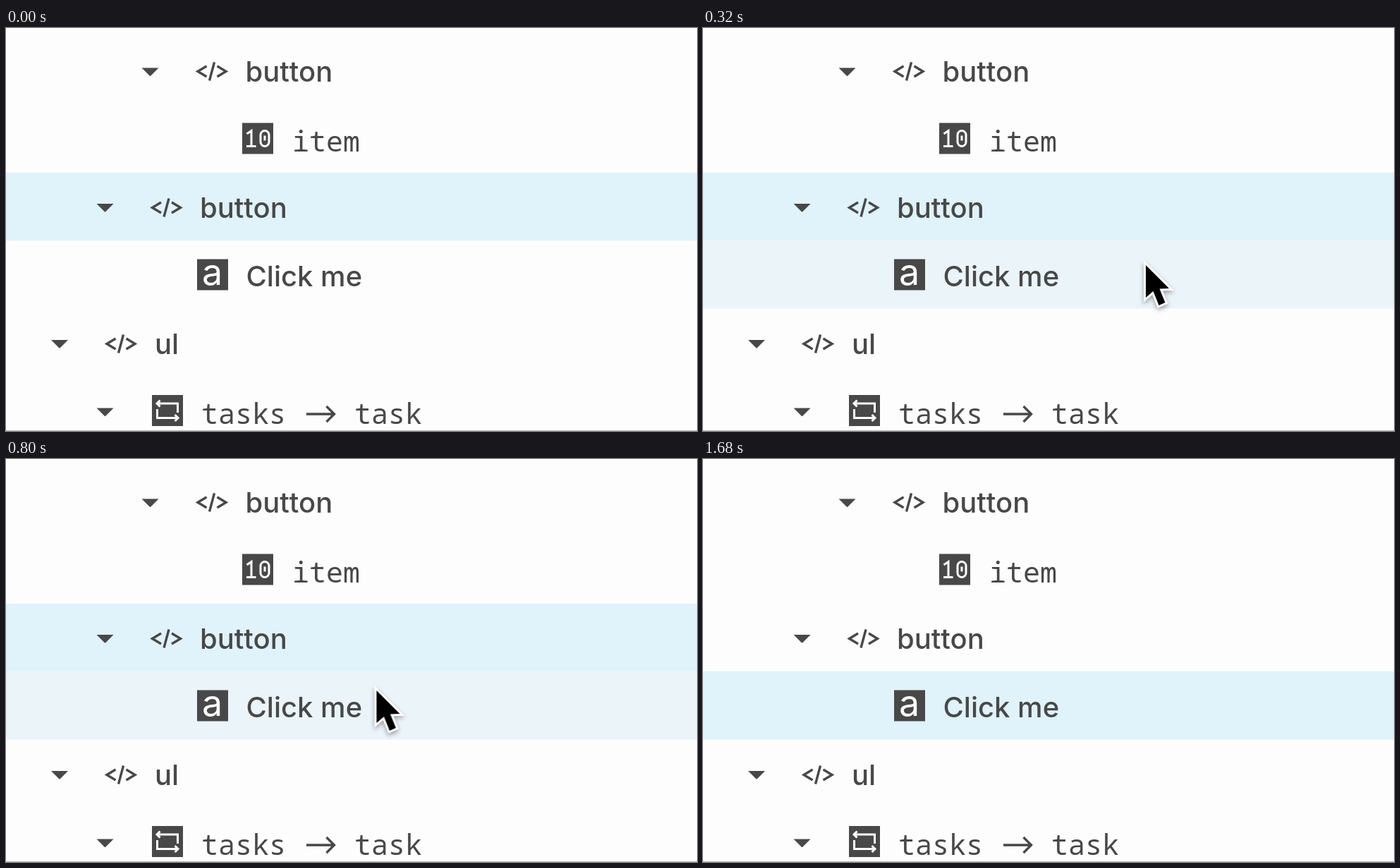
Recreate the animation shown at these times as an HTML page. Size 980 px wide and 571 px high, loop 2240 ms.

```html
<!DOCTYPE html>
<html lang="en">
<head>
<meta charset="utf-8">
<title>Tree selection</title>
<style>
  html, body { margin: 0; width: 100%; height: 100%; overflow: hidden; background: #fdfdfd; }
  svg { display: block; width: 980px; height: 571px; }
  text { fill: #484848; font: 500 40px Inter, sans-serif; }
  .mono { font: 400 40px "Noto Sans Mono", monospace; }
  .letter { fill: #fff; font: 400 52px Inter, sans-serif; text-anchor: middle; }
  .dark { fill: #484848; }
  .line { fill: none; stroke: #484848; stroke-width: 3.4; }
  .light { fill: none; stroke: #fff; stroke-width: 3; }

  .select, .hover, .cursor { animation: 2240ms step-end infinite; }
  .select { fill: #e0f2fa; animation-name: select; }
  .hover { fill: #eaf4f9; animation-name: hover; }
  .cursor { animation-name: cursor; filter: drop-shadow(0 3px 3px rgba(0, 0, 0, .35)); }

  @keyframes select {
    0% { transform: translateY(204.8px); }
    46.42%, 100% { transform: translateY(301.2px); }
  }
  @keyframes hover {
    0% { transform: translateY(600px); }
    7.14% { transform: translateY(494px); }
    14.28% { transform: translateY(301.2px); }
    17.85% { transform: translateY(600px); }
    32.14% { transform: translateY(301.2px); }
    46.42%, 100% { transform: translateY(600px); }
  }
  @keyframes cursor {
    0% { transform: translate(1100px, 700px); }
    7.14% { transform: translate(778px, 546px); }
    10.71% { transform: translate(717px, 451px); }
    14.28% { transform: translate(628px, 336px); }
    17.85% { transform: translate(584px, 298px); }
    28.57% { transform: translate(582px, 298px); }
    32.14% { transform: translate(548px, 313px); }
    35.71% { transform: translate(525.5px, 328px); }
    60.71% { transform: translate(526px, 333px); }
    71.42% { transform: translate(632px, 333px); }
    74.99%, 100% { transform: translate(1100px, 700px); }
  }
</style>
</head>
<body>
<svg viewBox="0 0 980 571">
  <defs>
    <path id="caret" class="dark" d="M-12-5.500h24L1 5.500Q0 6.500-1 5.500Z"/>
    <g id="tag" class="line">
      <path d="M-7.500-8-20-.5-7.500 7M7.500-8 20-.5 7.500 7"/>
      <path d="M3.500-13.500-3.500 12.500"/>
    </g>
    <rect id="box" class="dark" x="-22" y="-22" width="44" height="44"/>
  </defs>

  <rect width="980" height="571" fill="#fdfdfd"/>
  <rect class="select" width="980" height="96.4"/>
  <rect class="hover" width="980" height="96.4"/>

  <use href="#caret" x="204.500" y="62"/>
  <use href="#tag" x="292" y="62"/>
  <text x="339.500" y="76">button</text>

  <g transform="translate(357 156.500)">
    <use href="#box"/>
    <path class="light" d="M-15.500-6.500-9-11V11.500M-16 11H-2.500M4-5a6 6 0 0 1 12 0v10a6 6 0 0 1-12 0ZM10-4v7"/>
  </g>
  <text class="mono" x="406" y="175">item</text>

  <use href="#caret" x="140.500" y="254.500"/>
  <use href="#tag" x="227.500" y="255"/>
  <text x="275" y="269">button</text>

  <use href="#box" x="293" y="349.500"/>
  <text class="letter" x="292.500" y="364">a</text>
  <text x="340.500" y="365.500">Click me</text>

  <use href="#caret" x="76" y="447.500"/>
  <use href="#tag" x="163" y="448"/>
  <text x="211" y="462">ul</text>

  <use href="#caret" x="140.500" y="544"/>
  <g transform="translate(229 542)">
    <use href="#box"/>
    <path class="light" d="M-15-10H14.500V3M-10.500-14.500-15-10-10.500-5.500M15 10.500H-14.500V-2M10.500 6 15 10.500 10.500 15"/>
  </g>
  <text class="mono" x="277" y="561">tasks</text>
  <path class="line" d="M426 547H465M454.500 536 465.500 547 454.500 558"/>
  <text class="mono" x="494" y="561">task</text>

  <path d="M0 570.500H980" stroke="#b4b4b4"/>

  <g class="cursor">
    <path d="M0 0V46L10.500 37 18.500 57 27.500 53 19.500 33.500 33 33Z"
      stroke="#fff" stroke-width="6" paint-order="stroke"/>
  </g>
</svg>
</body>
</html>
```
